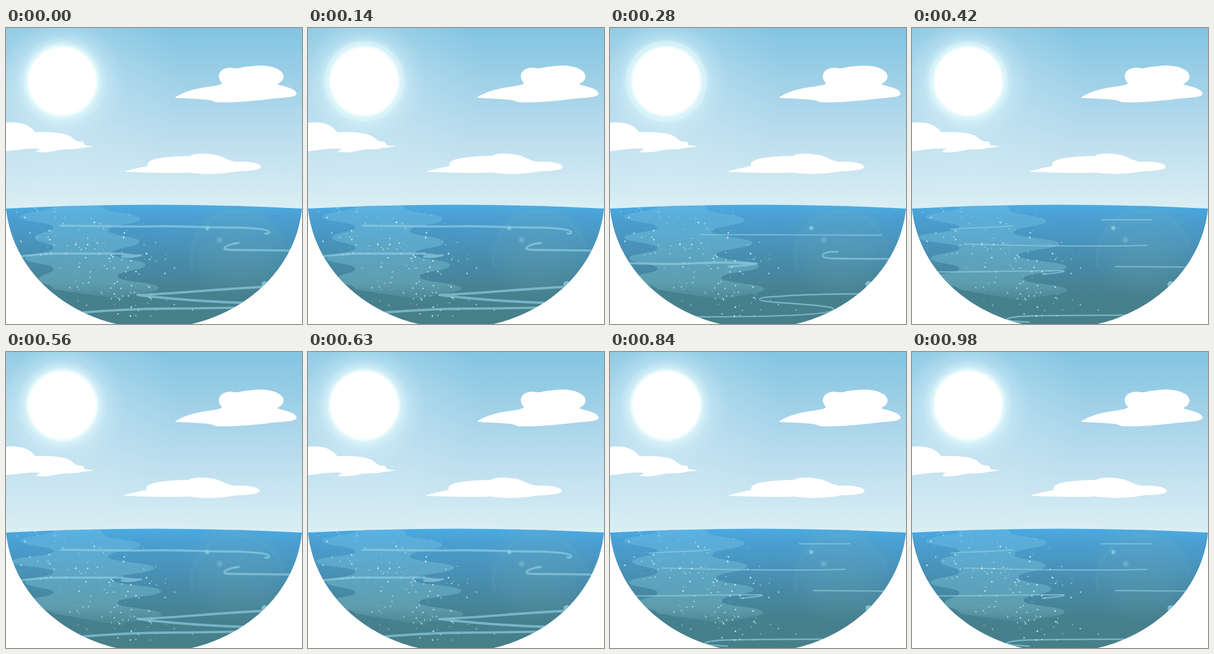
These frames come from a looping animation (500 by 500 pixels, 1010 ms). An HTML page with a canvas:

```html
<!DOCTYPE html>
<html lang="en">
<head>
<meta charset="utf-8">
<title>Sunlit sea</title>
<style>
html, body { margin: 0; width: 100%; height: 100%; overflow: hidden; background: #fff; }
canvas { display: block; width: 100%; height: 100%; }
</style>
</head>
<body>
<canvas id="stage" width="500" height="500"></canvas>
<script>
const ctx = document.getElementById('stage').getContext('2d');
const LOOP = 1010;
const BEAT = 70;
const TURN = Math.PI * 2;

const clouds = {
  right: new Path2D('M286 117C300 107 325 101 345 99C356 97 363 96 365 93C355 84 358 67 380 67C394 70 395 66 410 65C440 60 468 67 469 82C468 90 462 92 458 95C470 99 490 102 491 111C489 118 470 117 445 120C420 123 380 127 353 125C348 120 320 120 286 118Z'),
  left: new Path2D('M0 160C15 158 27 160 37 165C47 171 48 175 50 176C70 175 95 176 107 182C118 189 116 192 130 192L133 198L149 200L125 203C115 206 105 204 90 206C75 210 60 211 50 209L58 204C40 202 20 206 0 208Z'),
  middle: new Path2D('M202 242C215 238 230 235 240 233C235 222 260 217 312 216C315 211 345 211 360 216C372 220 378 225 390 226C410 225 431 228 431 235C428 242 400 241 385 243C365 247 340 248 310 244C280 246 240 244 202 243Z')
};

const sea = new Path2D('M0 305Q250 292 500 305A251 222 0 0 1 0 305Z');

// three wave drawings, as path and line width
const waves = [
  [
    ['M92 334C150 334 200 336 250 335S350 338 390 337C420 338 442 340 444 344Q446 348 438 347', 3.6],
    ['M490 376L400 375C380 375 368 375 369 372Q371 366 393 363', 3.6],
    ['M14 387C40 384 60 381 90 381S160 381 190 381L222 385Q208 388 196 386L228 384', 3.4],
    ['M450 437C370 439 290 449 222 451C280 458 350 463 420 465', 3.8],
    ['M110 482C160 478 220 474 270 474S360 473 420 472', 3.8]
  ],
  [
    ['M152 349L458 350', 1.8],
    ['M485 390C440 390 400 390 372 389C360 388 357 386 360 382Q366 377 385 378', 2.8],
    ['M8 397C50 397 90 400 130 398S200 395 248 398Q225 402 200 403', 3.6],
    ['M440 449C380 449 330 450 290 453C240 455 240 461 290 464C330 467 380 470 378 475C375 488 200 488 110 488', 2.3]
  ],
  [
    ['M320 324L405 324', 2],
    ['M66 340C90 337 130 338 170 334', 2],
    ['M88 365C150 366 200 368 250 368S350 369 397 367', 2],
    ['M344 403L478 404', 2.2],
    ['M44 412C110 412 180 410 255 410Q266 412 220 416', 2.2],
    ['M390 485C310 485 230 485 185 487C155 490 155 493 170 495L198 497', 2.4]
  ]
].map(set => set.map(([d, width]) => [new Path2D(d), width]));

function random(seed) {
  const n = Math.sin(seed * 127.1) * 43758.5453;
  return n - Math.floor(n);
}

// a band of glitter running down and to the right
const sparkles = Array.from({ length: 150 }, (_, i) => {
  const y = 303 + random(i + 1) * 185;
  const spread = random(i + 300) + random(i + 600) - 1;
  return { x: 105 + (y - 303) * .62 + spread * 125, y, strength: random(i + 900) };
});

function fade(gradient, stops) {
  stops.forEach(([at, color]) => gradient.addColorStop(at, color));
  return gradient;
}

const vertical = (y0, y1, stops) => fade(ctx.createLinearGradient(0, y0, 0, y1), stops);
const radial = (x, y, r, stops) => fade(ctx.createRadialGradient(x, y, 0, x, y, r), stops);

function disc(x, y, r, fill) {
  ctx.fillStyle = fill;
  ctx.beginPath();
  ctx.arc(x, y, r, 0, TURN);
  ctx.fill();
}

function glow(x, y, r, rgb, alpha) {
  disc(x, y, r, radial(x, y, r, [[0, `rgba(${rgb},${alpha})`], [1, `rgba(${rgb},0)`]]));
}

const skyFill = vertical(0, 305, [[0, '#82c4e1'], [.33, '#a2d2e8'], [.66, '#c0e0ef'], [1, '#dbeff4']]);
const seaFill = vertical(298, 500, [[0, '#4aabe3'], [.1, '#4aa0d3'], [.3, '#4994bd'], [.55, '#4788a2'], [.75, '#46808e'], [1, '#477f88']]);
const glitterFill = vertical(298, 464, [[0, 'rgba(122,200,232,.3)'], [.3, 'rgba(122,200,226,.4)'], [.8, 'rgba(126,192,205,.42)'], [1, 'rgba(126,192,205,.04)']]);
const sunFill = radial(95, 90, 104, [[0, '#fff'], [.58, 'rgba(232,250,253,.75)'], [.75, 'rgba(215,242,250,.28)'], [1, 'rgba(215,242,250,0)']]);

function drawSky(phase) {
  ctx.fillStyle = skyFill;
  ctx.fillRect(0, 0, 500, 305);
  glow(95, 90, 200, '230,246,252', .4);
  disc(95, 90, 104, sunFill);
  disc(95, 90, 64.5 + 4 * Math.sin(phase), 'rgba(218,247,251,.55)');
  disc(95, 90, 60, 'rgba(240,253,254,.8)');
  disc(95, 90, 57, '#fff');
  ctx.fillStyle = '#fff';
  ctx.fill(clouds.right);
  ctx.fill(clouds.left);
  ctx.save();
  ctx.translate(1.2 * Math.cos(phase) - 1.4, 0);
  ctx.fill(clouds.middle);
  ctx.restore();
}

// even rows are tips, odd rows are notches
function rightPoint(row, sway) {
  const x = row % 2 ? 160 + 4 * row : 216 + 5.5 * row + 15 * sway * Math.sin((row - 2) / 2);
  return [x, 285 + 19.5 * row + 2 * sway];
}

function leftPoint(row, sway) {
  const x = row % 2 ? 80 : 20 + 2 * row - 20 * sway * Math.sin((row - 2) * Math.PI / 4) ** 2;
  return [x, 284 + 17.5 * row];
}

function edge(points) {
  ctx.lineTo(...points[0]);
  for (let i = 1; i < points.length; i++) {
    const [x0, y0] = points[i - 1];
    const [x1, y1] = points[i];
    const y = (y0 + y1) / 2;
    ctx.bezierCurveTo(x0, y, x1, y, x1, y1);
  }
}

function drawGlitter(sway) {
  const rows = Array.from({ length: 9 }, (_, i) => i + 1);
  ctx.fillStyle = glitterFill;
  ctx.beginPath();
  ctx.moveTo(80, 298);
  ctx.lineTo(160, 298);
  edge(rows.map(row => rightPoint(row, sway)));
  edge(rows.map(row => leftPoint(row, sway)).reverse());
  ctx.fill();
}

function drawFlare() {
  disc(390, 367, 92, radial(390, 367, 92, [[0, 'rgba(125,180,180,.2)'], [.6, 'rgba(125,180,185,.13)'], [1, 'rgba(125,180,185,0)']]));
  ctx.strokeStyle = 'rgba(140,195,195,.06)';
  ctx.lineWidth = 6;
  ctx.beginPath();
  ctx.arc(391, 388, 78, Math.PI * .92, Math.PI * 1.95);
  ctx.stroke();
  glow(340, 338, 5, '185,230,240', .8);
  glow(361, 358, 7, '150,210,225', .5);
  disc(437, 433, 5.5, 'rgba(145,205,220,.8)');
}

function drawWaves(set) {
  ctx.strokeStyle = 'rgba(143,206,226,.68)';
  ctx.lineCap = ctx.lineJoin = 'round';
  for (const [path, width] of set) {
    ctx.lineWidth = width;
    ctx.stroke(path);
  }
}

function drawSea(sway, set) {
  ctx.save();
  ctx.clip(sea);
  ctx.fillStyle = seaFill;
  ctx.fillRect(0, 290, 500, 210);
  drawGlitter(sway);
  drawFlare();
  drawWaves(set);
  for (const { x, y, strength } of sparkles) {
    disc(x, y, .7 + strength * .6, `rgba(225,248,252,${.4 + strength * .5 - sway * .05})`);
  }
  ctx.restore();
}

function draw(time) {
  // every sixth beat holds the previous picture
  const beat = Math.floor(time % LOOP / BEAT);
  const shown = beat % 6 === 1 ? beat - 1 : beat;
  const phase = shown * BEAT / LOOP * TURN;
  const set = Math.max(0, Math.min(6, Math.floor(beat / 2)) - 1) % 3;
  ctx.clearRect(0, 0, 500, 500);
  drawSky(phase);
  drawSea(-Math.cos(phase), waves[set]);
}

const begin = performance.now();
function tick() {
  draw(performance.now() - begin);
  requestAnimationFrame(tick);
}
tick();
</script>
</body>
</html>
```
